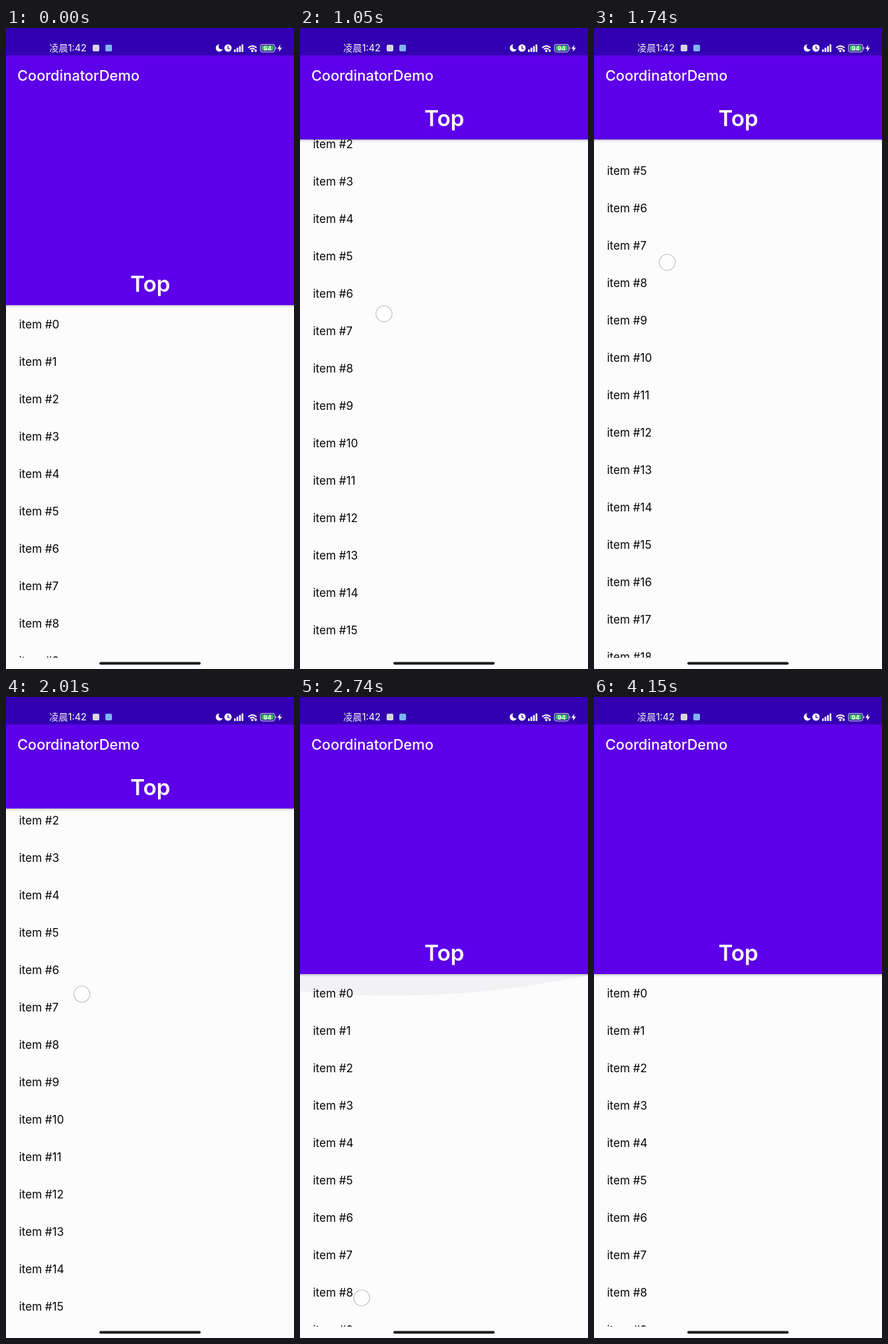
Recreate the animation shown at these times as an HTML page with a canvas. Size 432 by 960 pixels, loop 4190 ms.

```html
<!DOCTYPE html>
<html lang="en">
<head>
<meta charset="utf-8">
<title>CoordinatorDemo</title>
<style>
  html, body { margin: 0; width: 100%; height: 100%; overflow: hidden; background: #fcfcfd; }
  canvas { display: block; width: 100vw; height: 100vh; }
</style>
</head>
<body>
<canvas id="stage"></canvas>
<script>
const W = 432, H = 960, LOOP = 4190, STEPS = 92;
const EXPANDED = 415, RANGE = 248, ROW = 56, LIST_END = 943;
const SANS = 'Inter, "Noto Sans CJK SC", "Noto Sans CJK", sans-serif';
const PAPER = '#fcfcfd', VIOLET = '#5d00e9', INDIGO = '#3300b1', LIGHT = '#fcfcfd';

const canvas = document.getElementById('stage');
const ctx = canvas.getContext('2d');
const dpr = window.devicePixelRatio || 1;
canvas.width = W * dpr;
canvas.height = H * dpr;
ctx.scale(dpr, dpr);

// Key points of the drag: [step, value] and [step, x, y]
const scrollKeys = [[6.4, 0], [13, 115], [23, 382], [31, 514], [38, 510], [50, 199], [57, -4]];
const fingerKeys = [[6, 137, 822], [13, 133.5, 704.5], [23, 126, 428], [31, 113, 314],
                    [38, 110, 351], [50, 115, 573], [60, 92.5, 900], [63, 88, 930]];

// Smooth curve through one column of the keys, held at both ends
function curve(keys, n, col = 1) {
  const last = keys.length - 1;
  if (n <= keys[0][0]) return keys[0][col];
  if (n >= keys[last][0]) return keys[last][col];
  const slope = k => {
    if (k === 0) return 0;
    const a = keys[k - 1], b = keys[Math.min(k + 1, last)];
    return (b[col] - a[col]) / (b[0] - a[0]);
  };
  const i = keys.findIndex(k => k[0] > n) - 1;
  const a = keys[i], b = keys[i + 1];
  const d = b[0] - a[0], u = (n - a[0]) / d;
  const ease = u * u * (3 - 2 * u);
  return a[col] + (b[col] - a[col]) * ease
       + d * u * (1 - u) * (slope(i) * (1 - u) - slope(i + 1) * u);
}

function rect(x, y, w, h, color) {
  ctx.fillStyle = color;
  ctx.fillRect(x, y, w, h);
}

function pill(x, y, w, h, r, color) {
  ctx.fillStyle = color;
  ctx.beginPath();
  ctx.roundRect(x, y, w, h, r);
  ctx.fill();
}

function disc(x, y, r, color) {
  ctx.fillStyle = color;
  ctx.beginPath();
  ctx.arc(x, y, r, 0, Math.PI * 2);
  ctx.fill();
}

function label(str, x, y, size, weight, color, align = 'left') {
  ctx.font = `${weight} ${size}px ${SANS}`;
  ctx.textAlign = align;
  ctx.fillStyle = color;
  ctx.fillText(str, x, y);
}

function clipTo(y, h) {
  ctx.beginPath();
  ctx.rect(0, y, W, h);
  ctx.clip();
}

function drawList(scroll, top) {
  ctx.save();
  clipTo(top, LIST_END - top);
  const base = EXPANDED + 34.5 - scroll;
  const first = Math.max(0, Math.floor((top - base) / ROW));
  for (let i = first; base + i * ROW < LIST_END + 20; i++) {
    label('item #' + i, 19.5, base + i * ROW, 17, 400, '#060608');
  }
  ctx.restore();
}

// Overscroll arc: swells fast, fades slowly
function drawGlow(top, n) {
  const u = (n - 57) / 15.5;
  if (u <= 0 || u >= 1) return;
  const swell = Math.sin(Math.PI * u ** 0.6);
  ctx.save();
  clipTo(top, 60);
  ctx.fillStyle = `rgba(70, 60, 90, ${0.06 * swell})`;
  ctx.beginPath();
  ctx.moveTo(-160, top);
  ctx.quadraticCurveTo(140, top + 70 * swell, 440, top);
  ctx.fill();
  ctx.restore();
}

function drawHeader(bottom) {
  const shade = ctx.createLinearGradient(0, bottom, 0, bottom + 4);
  shade.addColorStop(0, 'rgba(60, 60, 70, .26)');
  shade.addColorStop(1, 'rgba(60, 60, 70, 0)');
  rect(0, bottom, W, 4, shade);
  rect(0, 41, W, bottom - 41, VIOLET);
  label('Top', 216.5, bottom - 20, 33, 600, LIGHT, 'center');
  label('CoordinatorDemo', 17, 79, 21.6, 500, LIGHT);
}

function drawWifi(x, y) {
  ctx.strokeStyle = LIGHT;
  ctx.lineWidth = 2;
  for (const r of [4.6, 8.2]) {
    ctx.beginPath();
    ctx.arc(x, y, r, -Math.PI * 0.77, -Math.PI * 0.23);
    ctx.stroke();
  }
  disc(x, y - 0.8, 1.8, LIGHT);
  rect(x + 3.5, y - 3, 3, 3.5, LIGHT);
}

function drawBattery(x, y) {
  const rim = '#b5bcd6';
  ctx.strokeStyle = rim;
  ctx.lineWidth = 1.2;
  ctx.beginPath();
  ctx.roundRect(x, y, 21.4, 11.2, 3.2);
  ctx.stroke();
  pill(x + 1.7, y + 1.7, 18, 7.8, 1.8, '#2fbd55');
  pill(x + 22.4, y + 3.6, 1.3, 4, 0.6, rim);
  label('94', x + 10.7, y + 8.9, 9, 700, LIGHT, 'center');
}

// One half of the bolt, then the same half turned around
function drawBolt(x, y) {
  ctx.fillStyle = LIGHT;
  ctx.beginPath();
  for (const s of [1, -1]) {
    ctx.lineTo(x + s, y - 5.3 * s);
    ctx.lineTo(x - 3.5 * s, y + 0.9 * s);
    ctx.lineTo(x - 0.5 * s, y + 0.9 * s);
  }
  ctx.fill();
}

function drawClock(x, y) {
  disc(x, y, 5.5, LIGHT);
  ctx.strokeStyle = INDIGO;
  ctx.lineWidth = 1.3;
  ctx.beginPath();
  ctx.moveTo(x, y - 3.2);
  ctx.lineTo(x, y + 0.4);
  ctx.lineTo(x + 2.6, y + 1.4);
  ctx.stroke();
}

function drawStatus() {
  rect(0, 0, W, 41, INDIGO);
  label('凌晨1:42', 65, 35.3, 14, 500, '#e6e6f2');
  pill(130, 25, 10, 10, 2, '#d6d6e2');
  pill(149, 25, 10, 10, 2, '#7fb4f2');
  disc(320, 30, 5.4, LIGHT);
  disc(323.2, 27.6, 4.4, INDIGO);
  drawClock(333, 30);
  for (let i = 0; i < 4; i++) {
    const h = 4 + i * 2.5;
    pill(342 + i * 3.8, 36 - h, 2.6, h, 0.8, LIGHT);
  }
  drawWifi(369.5, 35.2);
  drawBattery(381.6, 24.6);
  drawBolt(410.5, 30.3);
}

function drawTouch(n) {
  if (n < fingerKeys[0][0] || n > fingerKeys.at(-1)[0]) return;
  disc(curve(fingerKeys, n, 1), curve(fingerKeys, n, 2), 12, 'rgba(255, 255, 255, .5)');
  ctx.strokeStyle = 'rgba(90, 90, 100, .38)';
  ctx.lineWidth = 1.1;
  ctx.stroke();
}

function draw(n) {
  const scroll = Math.max(0, curve(scrollKeys, n));
  const bottom = EXPANDED - Math.min(scroll, RANGE);
  rect(0, 0, W, H, PAPER);
  drawList(scroll, bottom);
  drawGlow(bottom, n);
  drawHeader(bottom);
  drawStatus();
  pill(140, 949.5, 152, 4, 2, '#1c1c20');
  drawTouch(n);
}

const start = performance.now();

// The picture advances in even steps, a touch early to absorb timer rounding
function tick() {
  const t = (performance.now() - start) % LOOP;
  draw(Math.floor((t + 6) * STEPS / LOOP) % STEPS);
  requestAnimationFrame(tick);
}
tick();
</script>
</body>
</html>
```
